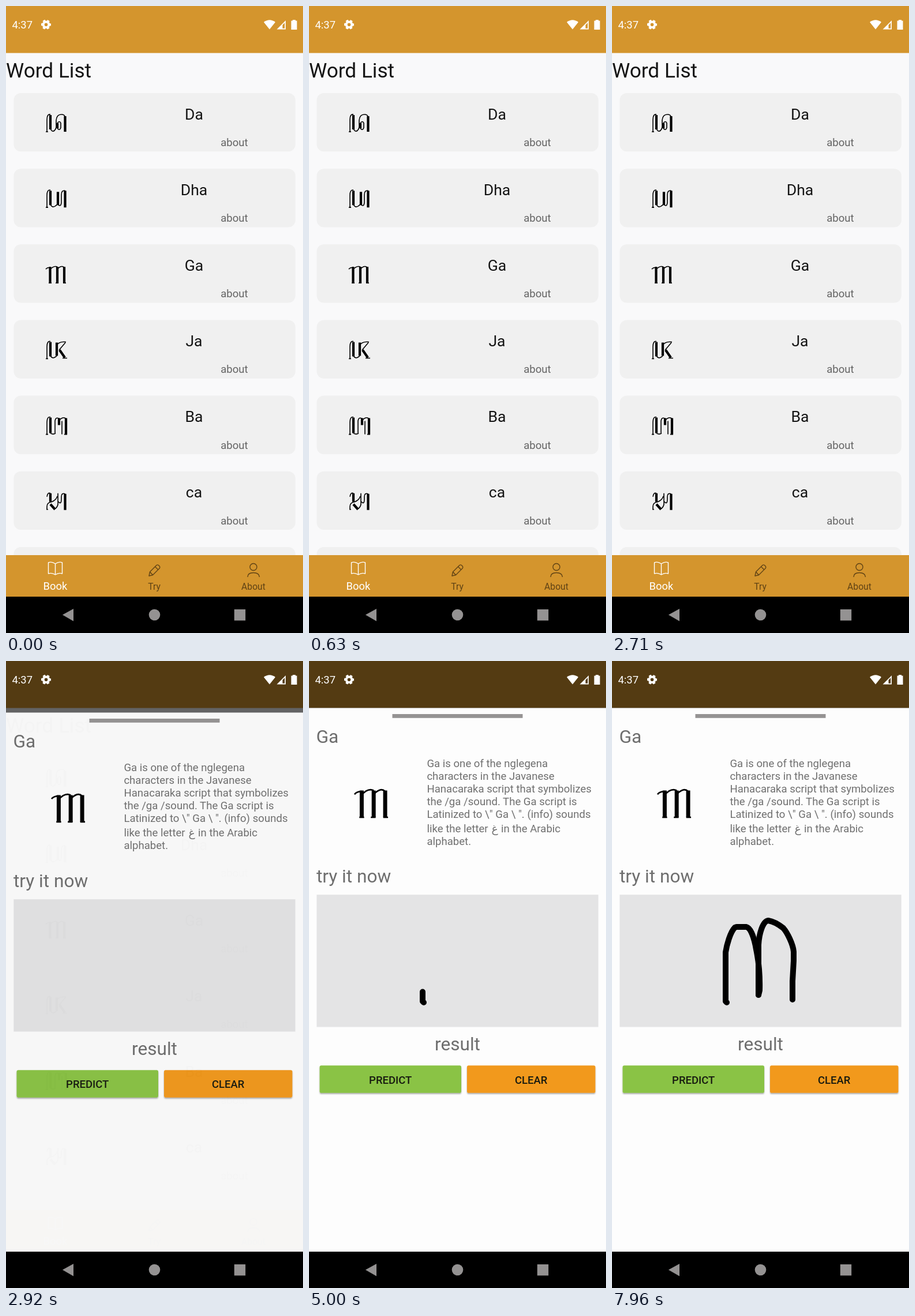
Recreate the animation shown at these times as an HTML page. Size 515 by 1087 pixels, loop 8000 ms.

```html
<!DOCTYPE html>
<html lang="en">
<head>
<meta charset="utf-8">
<style>
html, body { margin: 0; width: 100%; height: 100%; overflow: hidden; background: #000; }
svg { display: block; width: 100%; height: 100%; font-family: Roboto, sans-serif; }
.mid { text-anchor: middle; }
.word { font-size: 26.6px; fill: #141414; }
.note { font-size: 18.6px; fill: #656565; }
.head { font-size: 31.6px; fill: #6e6e6e; }
.info { font-size: 18.6px; fill: #707070; }
.btn { font-size: 18.5px; font-weight: 500; fill: #171a10; }
.thick, .thin, .line, .pen { fill: none; stroke: #000; }
.thick { stroke-width: 4.2; }
.thin { stroke-width: 1.6; }
.line { stroke-width: 1.4; stroke: inherit; stroke-linejoin: round; }
.pen { stroke-width: 10; stroke-linecap: round; stroke-linejoin: round; }
</style>
</head>
<body>
<svg viewBox="0 0 515 1087" preserveAspectRatio="none">
  <defs>
    <clipPath id="screen"><rect width="515" height="1024"/></clipPath>
    <filter id="soft"><feGaussianBlur stdDeviation=".45"/></filter>
    <filter id="shade" x="-5%" y="-20%" width="110%" height="150%">
      <feDropShadow dx="0" dy="1.8" stdDeviation="1.3" flood-opacity=".35"/>
    </filter>
  </defs>

  <rect width="515" height="1024" fill="#f9f9fa"/>
  <text x="0" y="123.5" font-size="35.2" fill="#141414">Word List</text>
  <g id="list"></g>

  <path d="M0 0H515V81.5H0ZM0 952H515V1024H0Z" fill="#d4952d"/>
  <g stroke="#fff">
    <path class="line" d="M85.5 967Q79 962.500 73.500 965V984Q80 982 85.500 986Q91 982 97.500 984V965Q92 962.500 85.500 967V986"/>
  </g>
  <text class="mid" x="85.5" y="1011.5" font-size="18.4" fill="#fff">Book</text>
  <g stroke="#604315" fill="#604315">
    <path class="line" d="M248 988L249.500 981L261 969.500Q263 968 265 970L266 971Q267.500 973 266 975L254.500 986.500ZM258.500 972L263.500 977M249.500 981L254.500 986.500"/>
    <circle class="line" cx="429" cy="972.500" r="6"/>
    <path class="line" d="M419 990Q419 982.500 429 982.500T439.500 990"/>
    <g class="mid" font-size="15.7" stroke="none">
      <text x="257" y="1012">Try</text>
      <text x="429" y="1012">About</text>
    </g>
  </g>

  <rect id="dim" width="515" height="1024" opacity="0"/>

  <g clip-path="url(#screen)">
    <g id="sheet" opacity="0">
      <rect y="81.5" width="515" height="943" fill="#fdfdfd"/>
      <rect x="144.500" y="92" width="226" height="6.800" fill="#959393"/>
      <text class="head" x="12.500" y="142">Ga</text>
      <g id="sample" transform="translate(77.3 216.200) scale(1.66)" filter="url(#soft)"></g>
      <g id="info" class="info"></g>
      <text class="head" x="13" y="384">try it now</text>
      <rect x="13.300" y="405.200" width="488.400" height="229.300" fill="#e4e4e5"/>
      <path id="pen1" class="pen" d="M199 592L197 590V505C199 492 205 470 213 462L216 461H233C241 463 247 482 250 500C254 519 257 538 256 571L254 579"/>
      <path id="pen2" class="pen" d="M254 579V492C255 474 261 451 271 450Q283 452 297 463C304 471 314 491 315 504V520L313 555V587"/>
      <text class="head mid" x="257.500" y="675">result</text>
      <g filter="url(#shade)">
        <rect x="18.500" y="701.300" width="245.500" height="47.400" rx="2.800" fill="#8ac344"/>
        <rect x="274" y="701.300" width="222.500" height="47.400" rx="2.800" fill="#f2991f"/>
      </g>
      <text class="btn mid" x="141.200" y="732.500">PREDICT</text>
      <text class="btn mid" x="385.200" y="732.500">CLEAR</text>
    </g>
  </g>

  <g fill="#fff">
    <text x="10.500" y="39.400" font-size="18.4">4:37</text>
    <circle cx="69.500" cy="32.200" r="4.800" fill="none" stroke="#fff" stroke-width="4"/>
    <circle cx="69.500" cy="32.200" r="7.200" fill="none" stroke="#fff" stroke-width="2.600" stroke-dasharray="4.3 3.24" stroke-dashoffset="2.150"/>
    <path d="M447 28Q457 20.500 467 28L457 40.500Z"/>
    <path d="M469.500 40.500L485 25V40.500ZM479.500 33V38.800H483.300V29Z" fill-rule="evenodd"/>
    <path d="M497 25.500V24H502V25.500H504.500V41H494.500V25.500Z"/>
  </g>

  <rect y="1024" width="515" height="63"/>
  <g fill="#949292">
    <path d="M98 1055.500L117 1045V1066.500Z"/>
    <circle cx="257.500" cy="1055.500" r="9.800"/>
    <rect x="395.800" y="1046" width="19.400" height="19.400"/>
  </g>
</svg>

<script>
const $ = id => document.getElementById(id);

// Each entry: word, thick strokes, thin strokes
const words = [
  ["Da", "M9 4V29M34.500 6V33M21 18V27", "M1 33H5M3 33V12Q3 2 9 3M9 28Q12 34 16 31Q20 27 19 20V13Q20 3 28 3Q34 3 34.500 8M21 18Q25 13 27 18V26Q25 32 21 27"],
  ["Dha", "M9 4V29M22 6V29M34.500 4V33", "M1 33H5M3 33V12Q3 2 9 3M9 28Q12 34 17 31Q21 29 22 25M22 28Q27 33 28 25V11Q28 3 34.500 4"],
  ["Ga", "M8.500 5V33M21 5V33M33 5V33", "M1 9Q3 6 9 6M8 10Q15 2 21 5M20 10Q28 1 33 6M6 33H11M18 33H23M31 33H36"],
  ["Ja", "M9 4V29M25 18L34 31M20 5V28", "M1 33H5M3 33V12Q3 2 9 3M9 28Q13 35 20 28M20 10Q23 3 36 4M35 5L24 18M30 32H38"],
  ["Ba", "M9 4V31M24 5V17M36 5V33", "M1 33H5M3 33V12Q3 2 9 3M9 31Q14 34 18 31M17 31V10Q18 2 24 6M23 10Q31 1 36 6M29 33V10M33 33H38"],
  ["ca", "M9 4V19M9 23L17 32M34.500 5V33", "M2 32H5M3 32V27Q3 20 11 19Q19 16 21 9M3 10Q4 2 9 4M17 31Q23 27 22 19V4M22 18Q28 25 28 14V10Q28 3 34.500 5"],
  ["", "", ""]
];

const glyph = ([, thick, thin]) => `<path class="thick" d="${thick}"/><path class="thin" d="${thin}"/>`;

$("list").innerHTML = words.map((w, i) => `
  <g transform="translate(0 ${151 + i * 131.15})">
    <rect x="13.500" width="488.200" height="101.300" rx="12" fill="#f0f0f0"/>
    <g transform="translate(68 34)">${glyph(w)}</g>
    <text class="word mid" x="326" y="45.500">${w[0]}</text>
    <text class="note" x="372.200" y="92">${w[0] && "about"}</text>
  </g>`).join("");
$("sample").innerHTML = glyph(words[2]);

const info = [
  "Ga is one of the nglegena", "characters in the Javanese", "Hanacaraka script that symbolizes",
  "the /ga /sound. The Ga script is", "Latinized to \\\" Ga \\ \". (info) sounds", "like the letter", "alphabet."
];
$("info").innerHTML = info.map((s, i) =>
  `<text x="204.400" y="${183.5 + 22 * i + (i > 4 ? 3 : 0)}">${s}</text>`).join("") +
  `<text x="316.500" y="296.500" font-family="DejaVu Sans, sans-serif" font-size="19">غ</text>
   <text x="333" y="296.500">in the Arabic</text>`;

const clamp = x => Math.min(1, Math.max(0, x));
const span = (t, a, b) => clamp((t - a) / (b - a));
const pens = [["pen1", 4850, 5000, 19, 6230], ["pen2", 6380, 6540, 25, 7750]]
  .map(([id, ...timing]) => [$(id), $(id).getTotalLength(), ...timing]);

// A slow first touch, then an even pull along the rest of the path
function trace([el, size, start, mid, first, end], t) {
  const drawn = first * span(t, start, mid) + (size - first) * span(t, mid, end);
  el.style.visibility = t > start ? "visible" : "hidden";
  el.style.strokeDasharray = `${drawn} ${size + 20}`;
}

function draw(t) {
  const rise = (1 - Math.cos(Math.PI * span(t, 2785, 2940))) / 2;
  $("sheet").setAttribute("transform", `translate(0 ${217 * (1 - rise)})`);
  $("sheet").setAttribute("opacity", rise);
  $("dim").setAttribute("opacity", 0.6 * span(t, 2775, 2900));
  pens.forEach(p => trace(p, t));
}

const begin = performance.now();
(function tick() {
  draw((performance.now() - begin) % 8000);
  requestAnimationFrame(tick);
})();
</script>
</body>
</html>
```
